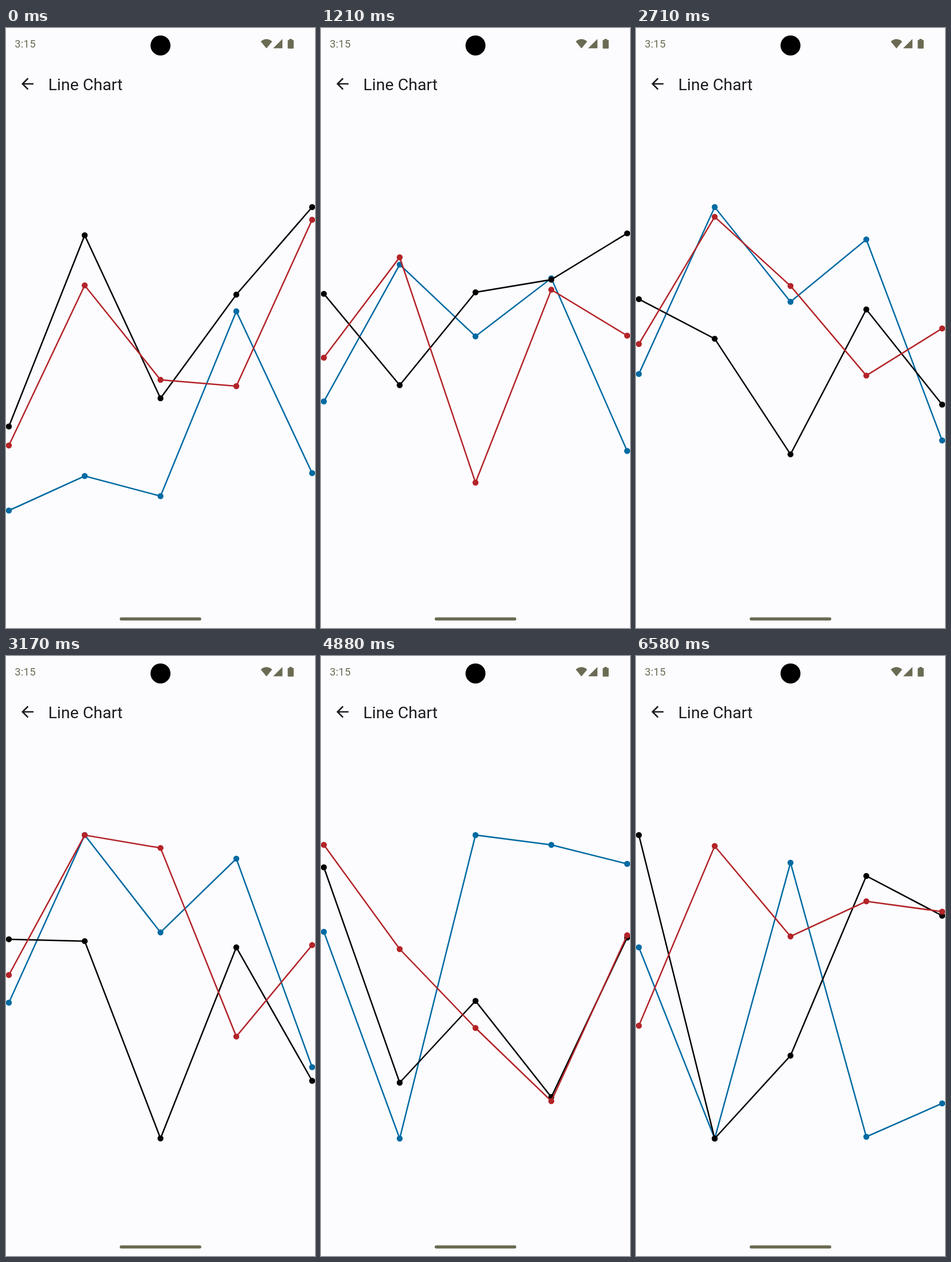
These frames come from a looping animation (538x1042 px, 6.62 s). An HTML page:

```html
<!DOCTYPE html>
<html lang="en">
<head>
<meta charset="utf-8">
<title>Line Chart</title>
<style>
  html, body { margin: 0; width: 100%; height: 100%; overflow: hidden; background: #fcfcff; }
  svg { display: block; width: 538px; height: 1042px; }
  text { font-family: Roboto, "Liberation Sans", sans-serif; }
  polyline { fill: none; stroke-width: 2.5; }
</style>
</head>
<body>
<svg viewBox="0 0 538 1042">
  <g fill="#6b6b54">
    <text x="15.3" y="34" font-size="18.3" letter-spacing=".3">3:15</text>
    <path d="M443.6 23.4Q453.5 15.2 463.4 23.4L453.5 35.6Z"/>
    <path d="M481.3 19V35.2H465.1Z"/>
    <path d="M493.3 19h4.6v1.7h2q1 0 1 1v13q0 1-1 1h-8.4q-1 0-1-1v-13q0-1 1-1h1.8z"/>
    <rect x="198" y="1023.5" width="142" height="5.4" rx="2.7"/>
  </g>
  <circle cx="269" cy="30.3" r="17.4"/>
  <g fill="#1a1c1e">
    <path transform="translate(21.7 81.3) scale(1.309)"
      d="M20 11H7.83l5.59-5.59L12 4l-8 8 8 8 1.41-1.41L7.83 13H20z"/>
    <text x="73.5" y="107.6" font-size="28.5">Line Chart</text>
  </g>
  <g id="chart"></g>
</svg>
<script>
const LOOP = 6620;
const FIRST = 710, PERIOD = 1511, MORPH = 985;
const LEFT = 5, GAP = 132, FLOOR = 838;

// Heights above the floor; each row is one state of the line.
const SERIES = [
  { color: '#006aa2', states: [
    [0, 60, 25, 346, 65],
    [241, 527, 378, 419, 114],
    [236, 527, 358, 486, 124],
    [359, 0, 527, 510, 477],
    [332, 0, 479, 3, 61]] },
  { color: '#000', states: [
    [146, 478, 195, 375, 527],
    [439, 147, 429, 408, 469],
    [346, 343, 0, 332, 100],
    [471, 97, 239, 72, 349],
    [527, 0, 144, 456, 387]] },
  { color: '#b32428', states: [
    [113, 391, 227, 216, 505],
    [307, 453, 0, 429, 249],
    [284, 527, 505, 177, 336],
    [510, 329, 192, 65, 353],
    [196, 508, 351, 412, 394]] }
];

const chart = document.getElementById('chart');
const xAt = i => LEFT + GAP * i;

function add(tag, attrs) {
  const el = document.createElementNS(chart.namespaceURI, tag);
  for (const key in attrs) el.setAttribute(key, attrs[key]);
  return chart.appendChild(el);
}

for (const s of SERIES) {
  s.line = add('polyline', { stroke: s.color });
  s.dots = s.states[0].map((_, i) => add('circle', { cx: xAt(i), r: 5.2, fill: s.color }));
}

// cubic-bezier(0.4, 0, 0.2, 1), solved by bisection
function ease(x) {
  if (x <= 0) return 0;
  if (x >= 1) return 1;
  let lo = 0, hi = 1;
  for (let i = 0; i < 24; i++) {
    const u = (lo + hi) / 2, v = 1 - u;
    if (1.2 * u * v * v + 0.6 * u * u * v + u * u * u < x) lo = u;
    else hi = u;
  }
  return lo * lo * (3 - 2 * lo);
}

function draw(time) {
  const step = Math.max(0, Math.floor((time - FIRST) / PERIOD));
  const k = ease((time - FIRST - step * PERIOD) / MORPH);
  for (const { states, line, dots } of SERIES) {
    const ys = states[step].map((h, i) => FLOOR - h - (states[step + 1][i] - h) * k);
    line.setAttribute('points', ys.map((y, i) => xAt(i) + ',' + y.toFixed(2)).join(' '));
    dots.forEach((dot, i) => dot.setAttribute('cy', ys[i].toFixed(2)));
  }
}

const begin = performance.now();

function tick() {
  draw((performance.now() - begin) % LOOP);
  requestAnimationFrame(tick);
}

tick();
</script>
</body>
</html>
```
